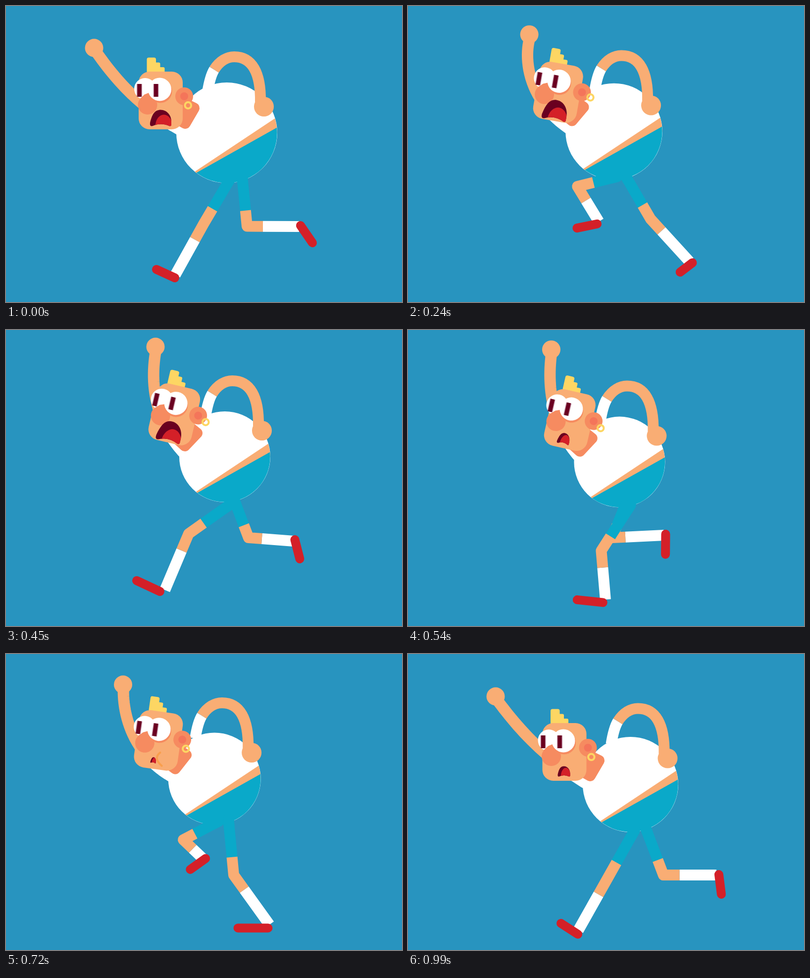
An HTML page with a canvas that plays this animation: 800 by 600 pixels, repeating every 1020 ms.

```html
<!DOCTYPE html>
<html lang="en">
<head>
<meta charset="utf-8">
<title>Runner</title>
<style>
  html, body { margin: 0; width: 100%; height: 100%; overflow: hidden; background: #2894bf; }
  canvas { display: block; }
</style>
</head>
<body>
<canvas id="stage" width="800" height="600"></canvas>
<script>
const ctx = document.getElementById('stage').getContext('2d');
const SKY = '#2894bf', TEAL = '#0aa9c9', SKIN = '#f9ad74', BLUSH = '#f68b60',
      PINK = '#f4755a', RED = '#d42028', WINE = '#6a0020', GOLD = '#fdd663', WHITE = '#fff';
const LOOP = 1020, STEP = 30;
const KEYS = [0, 150, 330, 450, 600, 840, 990];

// Periodic monotone cubic through one row of values per key time.
function track(rows) {
  const n = KEYS.length;
  const wrap = i => (i + n) % n;
  const span = i => (KEYS[wrap(i + 1)] - KEYS[wrap(i)] + LOOP) % LOOP;
  const slope = (i, c) => (rows[wrap(i + 1)][c] - rows[wrap(i)][c]) / span(i);
  const tangent = (i, c) => {
    const a = slope(i - 1, c), b = slope(i, c);
    return a * b <= 0 ? 0 : 2 * a * b / (a + b);
  };
  return t => {
    let i = n - 1;
    while (KEYS[i] > t) i--;
    const h = span(i), u = (t - KEYS[i]) / h, v = 1 - u;
    return rows[i].map((p, c) => {
      const q = rows[wrap(i + 1)][c];
      return v * v * (1 + 2 * u) * p + u * u * (3 - 2 * u) * q
        + h * u * v * (v * tangent(i, c) - u * tangent(i + 1, c));
    });
  };
}

// centre x, y, radius
const body = track([
  [446, 257, 102], [414, 267, 102], [421, 242, 93], [442, 257, 92],
  [419.5, 271, 92], [425.5, 235, 95.5], [449.5, 264.5, 96.5]]);
// centre x, y, tilt in degrees, neck x, y, earring swing in degrees
const head = track([
  [312.5, 191.5, 0, 380, 207, 23], [296, 191.5, 6.8, 350, 215, 60],
  [317, 158.4, 12.2, 364, 195, 55], [340, 171, 13.2, 386, 209, 49],
  [317, 186.4, 12.3, 364, 223, 41], [303.7, 164, 3, 364, 186, 6],
  [316, 198.5, 0, 386, 216, 20]]);
// centre x, base y, half width, height
const mouth = track([
  [0, 52, 21.5, 33], [0.5, 57, 24.5, 39], [0, 57, 25, 42], [-1, 57, 25, 42],
  [-4.5, 47, 5.5, 12], [-4.5, 47, 5.5, 12], [-1, 50, 12.5, 21]]);
// hand, start, two controls, shoulder
const arm = track([
  [178, 85, 180, 90, 215, 140, 265, 205, 360, 255],
  [213, 71, 214, 80, 217, 130, 240, 215, 325, 260],
  [276.5, 44.5, 276, 55, 262, 95, 250, 175, 345, 245],
  [302, 34, 302, 45, 294, 95, 292, 180, 365, 255],
  [275, 46, 275, 55, 272, 100, 272, 190, 340, 262],
  [199.5, 77, 201, 88, 212, 140, 245, 215, 340, 240],
  [177, 86, 179, 92, 215, 140, 268, 208, 370, 268]]);
// hip, knee, ankle, heel, toe, bare length on each side of the knee
const farLeg = track([
  [453, 350, 399, 442, 342, 545, 341, 551, 304, 534, 36],
  [438, 358, 479, 452, 541, 544, 548, 550, 508, 553, 34],
  [438, 326, 494.5, 411.5, 580, 475, 585, 473, 575, 513, 31],
  [462, 347, 490, 421, 581, 428, 583.5, 425, 593.5, 464, 27],
  [426, 358, 368, 421, 463, 413, 468, 411, 457, 450, 27],
  [440, 319, 354.5, 332, 357, 418, 361, 424, 321, 429, 26],
  [458, 357, 403, 455, 344, 560, 343, 568, 309, 546, 37]]);
const nearLeg = track([
  [477, 345, 487, 446.5, 592, 447, 595, 445, 619, 480, 32],
  [415, 367, 346, 413, 456, 436, 460, 441, 438, 477, 34],
  [435, 325, 341, 332, 338.5, 440, 329, 444, 280, 425, 32.5],
  [455, 352, 369, 413, 321, 527, 311, 530, 264, 508, 37],
  [447, 355, 407, 457, 463, 551, 461, 558, 406, 558, 33],
  [455, 315, 503, 439, 583, 542, 581, 548.5, 527, 548.5, 40],
  [479, 350, 516, 448, 623, 448, 628, 447, 633, 487, 32.5]]);

function disc(x, y, r, color) {
  ctx.fillStyle = color;
  ctx.beginPath();
  ctx.arc(x, y, r, 0, 7);
  ctx.fill();
}

function trace(pts) {
  ctx.beginPath();
  pts.forEach(p => ctx.lineTo(p[0], p[1]));
}

function line(pts, color, width = 22, cap = 'butt') {
  trace(pts);
  stroke(color, width, cap);
}

function stroke(color, width, cap = 'butt') {
  ctx.strokeStyle = color;
  ctx.lineWidth = width;
  ctx.lineCap = cap;
  ctx.lineJoin = 'round';
  ctx.stroke();
}

function poly(pts, color) {
  trace(pts);
  ctx.closePath();
  ctx.fillStyle = color;
  ctx.fill();
}

function toward(a, b, d) {
  const k = d / Math.hypot(b[0] - a[0], b[1] - a[1]);
  return [a[0] + (b[0] - a[0]) * k, a[1] + (b[1] - a[1]) * k];
}

function drawLeg([hx, hy, kx, ky, ax, ay, x1, y1, x2, y2, bare]) {
  const hip = [hx, hy], knee = [kx, ky], ankle = [ax, ay];
  const hem = toward(knee, hip, bare), sock = toward(knee, ankle, bare);
  line([hip, toward(hip, hem, 12)], TEAL, 22, 'round');
  line([hip, hem], TEAL);
  line([sock, ankle], WHITE);
  line([hem, knee, sock], SKIN);
  line([[x1, y1], [x2, y2]], RED, 18, 'round');
}

function drawRaisedArm([hx, hy, ...p]) {
  const at = (t, c) => {
    const s = 1 - t;
    return s * s * s * p[c] + 3 * s * s * t * p[c + 2] + 3 * s * t * t * p[c + 4] + t * t * t * p[c + 6];
  };
  const part = (from, to) => Array.from({ length: 25 }, (_, i) => {
    const t = from + (to - from) * i / 24;
    return [at(t, 0), at(t, 1)];
  });
  line(part(0, 1), SKIN, 23);
  line(part(0.78, 1), WHITE, 24);
  disc(hx, hy, 18.5, SKIN);
}

function drawBody([x, y, r]) {
  ctx.save();
  ctx.translate(x, y);
  ctx.scale(r / 102, r / 102);
  disc(0, 0, 102, WHITE);
  ctx.beginPath();
  ctx.arc(0, 0, 101.7, 0, 7);
  ctx.clip();
  poly([[-65, 79], [97, -29], [120, -20], [102, 0], [-63, 84]], SKIN);
  poly([[-63, 82], [102, -11], [120, 110], [-63, 110]], TEAL);
  ctx.restore();
}

function drawHipArm([x, y]) {
  ctx.save();
  ctx.translate(x, y);
  ctx.beginPath();
  ctx.moveTo(-39, -82);
  ctx.bezierCurveTo(-35, -107, -31, -119, -25.5, -128);
  stroke(WHITE, 22);
  ctx.beginPath();
  ctx.moveTo(-25.5, -128);
  ctx.bezierCurveTo(-14, -146, 1, -154, 15, -154);
  ctx.bezierCurveTo(51, -154, 69, -122, 68, -62);
  stroke(SKIN, 22);
  disc(75, -53, 20, SKIN);
  ctx.restore();
}

function drawMouth([x, base, w, h]) {
  if (w < 8) {
    ctx.globalAlpha = Math.min(1, (8 - w) / 2);
    ctx.beginPath();
    ctx.moveTo(7, 24);
    ctx.quadraticCurveTo(-6, 37, 14, 50);
    stroke('#f99f4d', 4, 'round');
    ctx.globalAlpha = 1;
  }
  ctx.save();
  ctx.translate(x, base);
  ctx.scale(w, h);
  ctx.beginPath();
  ctx.moveTo(-1, -0.2);
  ctx.bezierCurveTo(-0.8, -0.75, -0.55, -1, 0, -1);
  ctx.bezierCurveTo(0.6, -1, 1, -0.65, 1, -0.3);
  ctx.lineTo(1, -0.08);
  ctx.quadraticCurveTo(1, 0, 0.85, 0);
  ctx.quadraticCurveTo(0.1, -0.22, -0.6, -0.05);
  ctx.quadraticCurveTo(-1.05, 0.1, -1, -0.2);
  ctx.fillStyle = WINE;
  ctx.fill();
  ctx.clip();
  ctx.beginPath();
  ctx.ellipse(0.3, 0, 0.8, 1.05 - w * 0.016, 0, 0, 7);
  ctx.fillStyle = RED;
  ctx.fill();
  ctx.restore();
}

function drawPupil(x, y) {
  ctx.fillStyle = 'rgba(106, 0, 40, 0.45)';
  ctx.fillRect(x - 5.5, y - 13, 11, 26);
  ctx.fillStyle = WINE;
  ctx.fillRect(x - 4, y - 13, 8, 26);
}

function drawHead([x, y, tilt, nx, ny, swing], lips) {
  const turn = tilt * Math.PI / 180;
  ctx.save();
  ctx.translate(nx, ny);
  ctx.rotate(turn);
  poly([[0, 0], [-18, 31], [-50, 13], [-35, -17]], BLUSH);
  ctx.closePath();
  stroke(BLUSH, 22);
  ctx.restore();

  ctx.save();
  ctx.translate(x, y);
  ctx.rotate(turn);
  ctx.fillStyle = GOLD;
  ctx.beginPath();
  ctx.roundRect(-28, -87, 18.5, 32, 4);
  ctx.roundRect(-20, -77, 19, 22, 3);
  ctx.roundRect(-12, -67.5, 20, 12, 3);
  ctx.fill();
  ctx.fillStyle = SKIN;
  ctx.beginPath();
  ctx.roundRect(-44.5, -58.5, 89, 117, 22);
  ctx.fill();
  disc(47.5, -8.5, 18, BLUSH);
  disc(47.5, -8.5, 8, PINK);
  disc(-31.5, -23.5, 22, WHITE);
  disc(-0.5, -18.5, 23.5, BLUSH);
  drawPupil(-43, -20.5);
  disc(-26.5, 9, 19.5, BLUSH);
  poly([[-42, -3], [-33, -12], [-23, -16], [-8, 3]], BLUSH);
  disc(-2, -22.5, 23.5, WHITE);
  drawPupil(-9.5, -20.5);
  drawMouth(lips);
  ctx.restore();

  const cos = Math.cos(turn), sin = Math.sin(turn), a = swing * Math.PI / 180;
  const ex = x + 47.5 * cos + 8.5 * sin, ey = y + 47.5 * sin - 8.5 * cos;
  ctx.beginPath();
  ctx.arc(ex + 20 * Math.sin(a), ey + 20 * Math.cos(a), 6.3, 0, 7);
  stroke(GOLD, 4);
}

function draw(now) {
  const t = Math.floor(now / STEP + 1e-6) * STEP % LOOP;
  const belly = body(t);
  ctx.fillStyle = SKY;
  ctx.fillRect(0, 0, 800, 600);
  drawRaisedArm(arm(t));
  drawBody(belly);
  drawLeg(farLeg(t));
  drawLeg(nearLeg(t));
  drawHipArm(belly);
  drawHead(head(t), mouth(t));
}

function tick(now) {
  draw(now);
  requestAnimationFrame(tick);
}
draw(0);
requestAnimationFrame(tick);
</script>
</body>
</html>
```
